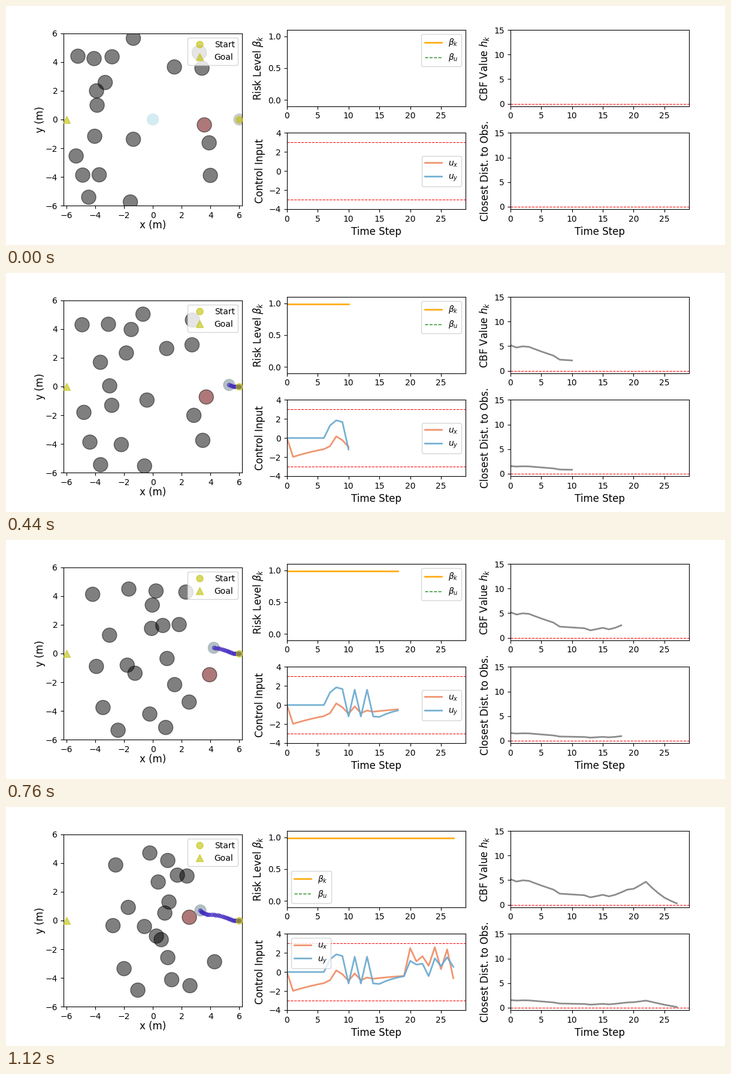
A matplotlib script that plays this animation: 1200 px wide and 400 px high, repeating every 1160 ms.

```python
import numpy as np
import matplotlib.pyplot as plt
from matplotlib.animation import FuncAnimation
from matplotlib.patches import Circle

STEPS = 29
DT = 0.1
SAFE = 0.9  # robot radius plus obstacle radius

# Each obstacle: start, halfway and end point in stage pixels
ROUTES = [
    ((212.5, 54), (236.5, 75.5), (270, 89.5)),
    ((120, 84), (132, 88), (183, 97)),
    ((147, 88), (183, 84.5), (240, 77)),
    ((177, 85), (223, 99.5), (254, 125.5)),
    ((165.5, 128), (217, 138), (265, 177.5)),
    ((151, 142), (162, 153), (204, 168)),
    ((152, 166), (183.5, 198), (231, 200)),
    ((281, 102), (264, 135), (286, 114)),
    ((327, 104), (302.5, 128), (272, 159)),
    ((322.5, 78), (306.5, 80.5), (302, 115.5)),
    ((148, 218), (190.5, 222.5), (251, 216)),
    ((212.5, 223), (247, 207.5), (306, 184.5)),
    ((339, 229), (301.5, 241), (259, 222)),
    ((117, 251), (137, 225), (178.5, 198.5)),
    ((128, 283), (147, 282.5), (197, 270.5)),
    ((155.5, 282.5), (210, 289), (276.5, 289)),
    ((138, 320), (168, 320.5), (220, 306.5)),
    ((207.5, 328), (243.5, 320), (307, 299)),
    ((341, 283.5), (321, 277.5), (270, 252)),
    ((331, 199), (336, 213), (348, 259)),
]


def walk(start, mid, end):
    """Cubic path that leaves its start at rest and passes mid and end."""
    start, mid, end = (np.array(p) for p in (start, mid, end))
    s = np.linspace(0, 1, STEPS)[:, None]
    a, b = 8 * (mid - start), end - start
    path = start + (a - b) * s**2 + (2 * b - a) * s**3
    return (path - (245.1, 190)) / (24.056, -24.056)


def decay(first, ratio, count):
    return first * ratio ** np.arange(count)


def drive(inputs):
    """Double integrator steered by the control inputs."""
    vel = np.vstack([(0, 0), np.cumsum(inputs, axis=0) * DT])
    moves = (vel[:-1] + vel[1:]) / 2 * DT
    return np.vstack([(6, 0), (6, 0) + np.cumsum(moves, axis=0)])


# Control inputs: cruise, dodge, settle, dodge again
ux = np.concatenate([
    [0], decay(-1.98, 0.9, 6),
    [-0.85, 0.17, -0.23, -0.93, -0.15, -0.85, -0.58],
    decay(-0.7, 0.9, 6),
    [2.5, 1.12, 1.65, 0.65, 2.6, 0.3, 2.37, -0.65],
])
uy = np.concatenate([
    np.zeros(7), [1.32, 1.85, 1.68],
    0.2 + decay(-1.4, -1, 5),
    decay(-1.25, 0.77, 5),
    [1.17, 0.78, 0.87, -0.43, 1.43, 0.62, 1.55, 0.55],
])

gap = np.interp(
    np.arange(STEPS - 1),
    [0, 1, 2, 3, 7, 8, 12, 13, 15, 16, 17, 19, 20, 22, 25, 27],
    [1.55, 1.45, 1.5, 1.48, 1.07, 0.85, 0.755, 0.62,
     0.78, 0.685, 0.78, 1.07, 1.11, 1.44, 0.6, 0.14])
cbf = (gap + SAFE) ** 2 - SAFE ** 2
risk = np.full(STEPS - 1, 0.985)

crowd = np.array([walk(*route) for route in ROUTES])
robot = drive(np.column_stack([ux, uy]))

fig, axes = plt.subplots(2, 3, figsize=(12, 4), dpi=100)
fig.subplots_adjust(left=0.08, right=0.95, top=0.9, bottom=0.15,
                    wspace=0.25, hspace=0.35)
grid = axes[0, 0].get_gridspec()
for ax in axes[:, 0]:
    ax.remove()

# Arena
arena = fig.add_subplot(grid[:, 0])
arena.set_aspect("equal")
arena.set(xlim=(-6.2, 6.2), ylim=(-6, 6),
          xticks=range(-6, 7, 2), yticks=range(-6, 7, 2))
arena.set_xlabel("x (m)", fontsize=12, labelpad=0)
arena.set_ylabel("y (m)", fontsize=12, labelpad=0)

discs = [arena.add_patch(Circle(path[0], 0.5, lw=1, ec=(0, 0, 0, 0.5)))
         for path in crowd]
body = arena.add_patch(Circle((0, 0), 0.4, color="lightblue", alpha=0.5, lw=0.5))
shade = arena.add_patch(Circle(robot[0], 0.4, color="gray", alpha=0.4, lw=0.5))
trail = arena.scatter([], [], s=20, color=(0.25, 0.15, 0.75), alpha=0.55, zorder=2)
for x, marker, label in ((6, "o", "Start"), (-6, "^", "Goal")):
    arena.plot(x, 0, marker, color="y", ms=8, alpha=0.6, label=label, zorder=3)
arena.legend(loc="upper right", handlelength=2)


def setup(ax, ylabel, ylim, yticks, limits=()):
    ax.set(xlim=(0, STEPS), ylim=ylim, xticks=range(0, 26, 5), yticks=yticks)
    ax.set_ylabel(ylabel, fontsize=12)
    for y in limits:
        ax.axhline(y, color="r", ls="--", lw=0.8)


def curve(ax, color, label=None, lw=2, ls="-"):
    return ax.plot([], [], color=color, lw=lw, ls=ls, alpha=0.9, label=label)[0]


(risk_ax, cbf_ax), (ctrl_ax, gap_ax) = axes[:, 1:]
setup(risk_ax, r"Risk Level $\beta_k$", (-0.1, 1.1), (0, 0.5, 1))
setup(cbf_ax, "CBF Value $h_k$", (-0.5, 15), range(0, 16, 5), [0])
setup(ctrl_ax, "Control Input", (-4, 4), range(-4, 5, 2), [3, -3])
setup(gap_ax, "Closest Dist. to Obs.", (-0.5, 15), range(0, 16, 5), [0])
for ax in (ctrl_ax, gap_ax):
    ax.set_xlabel("Time Step", fontsize=12)

curves = [
    (curve(risk_ax, "orange", r"$\beta_k$"), risk),
    (curve(ctrl_ax, "#ef8a62", "$u_x$"), ux),
    (curve(ctrl_ax, "#67a9cf", "$u_y$"), uy),
    (curve(cbf_ax, "gray"), cbf),
    (curve(gap_ax, "gray"), gap),
]
curve(risk_ax, "g", r"$\beta_u$", lw=1, ls="--")
# "best" lets the legends move out of the way of the growing curves
risk_ax.legend(loc="best")
ctrl_ax.legend(loc="best")


def update(k):
    spots = crowd[:, k]
    nearest = np.argmin(np.hypot(*(spots - robot[k]).T))
    for i, (disc, spot) in enumerate(zip(discs, spots)):
        disc.center = spot
        disc.set_facecolor((0.4, 0, 0.01, 0.53) if i == nearest else (0, 0, 0, 0.5))
    body.center = robot[k] if k else (0, 0)
    shade.center = robot[k]
    trail.set_offsets(robot[1:k + 1])
    for line, values in curves:
        line.set_data(range(k), values[:k])


anim = FuncAnimation(fig, update, frames=STEPS, interval=40, repeat=True)
plt.show()
```
